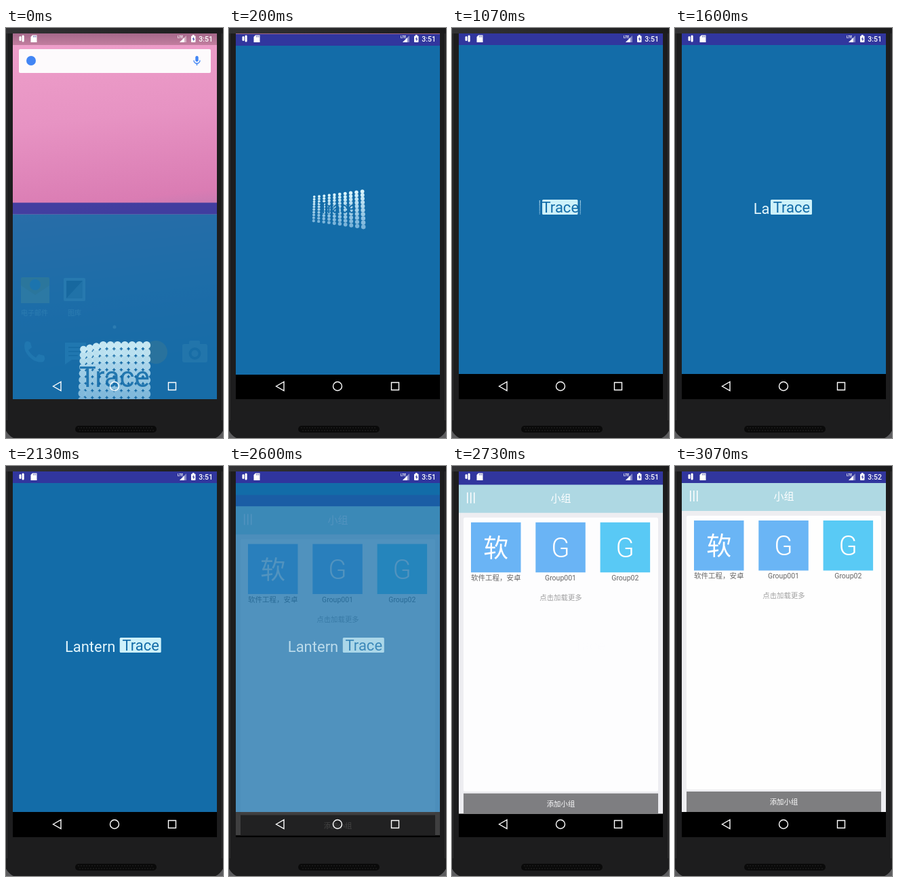
An HTML page with a canvas that plays this animation: 320x602 px, repeating every 3140 ms.

```html
<!DOCTYPE html>
<html lang="zh">
<head>
<meta charset="utf-8">
<style>
html, body { margin: 0; width: 100%; height: 100%; overflow: hidden; background: #111; }
canvas { display: block; width: 320px; height: 602px; }
</style>
</head>
<body>
<canvas id="stage" width="320" height="602"></canvas>
<script>
const LOOP = 3140, STEP = 1000 / 15;
const BLUE = '#136ca8', BAR = '#31369e', PALE = '#cdf1fa';
const FONT = 'Roboto, "Noto Sans CJK SC", "Noto Sans CJK", sans-serif';
const HOST = 'Lantern', BADGE = 'Trace';
const c = document.getElementById('stage').getContext('2d');

const clamp = v => Math.min(1, Math.max(0, v));
const mix = (a, b, p) => a + (b - a) * p;
const part = (t, start, length) => clamp((t - start) / length);
const easeOut = (p, power) => 1 - (1 - p) ** power;
const easeInOut = p => (1 - Math.cos(Math.PI * p)) / 2;

function rect(x, y, w, h, color, r = 0) {
  c.fillStyle = color;
  c.beginPath();
  c.roundRect(x, y, w, h, r);
  c.fill();
}

function disc(x, y, r, color) {
  c.fillStyle = color;
  c.beginPath();
  c.arc(x, y, r, 0, 7);
  c.fill();
}

function path(d, fill, stroke, width = 1) {
  const p = new Path2D(d);
  if (fill) { c.fillStyle = fill; c.fill(p); }
  if (stroke) { c.strokeStyle = stroke; c.lineWidth = width; c.stroke(p); }
}

function text(s, x, y, size, color, align = 'center', weight = 400) {
  c.font = `${weight} ${size}px ${FONT}`;
  c.textAlign = align;
  c.fillStyle = color;
  c.fillText(s, x, y);
}

function fade(stops, x0, y0, x1, y1) {
  const g = c.createLinearGradient(x0, y0, x1, y1);
  stops.forEach((s, i) => g.addColorStop(i / (stops.length - 1), s));
  return g;
}

function phone() {
  rect(0, 0, 320, 602, '#5c5c5e');
  rect(-3, -30, 326, 635, '#1d1d1e', 26);
  rect(0, 0, 320, 8, fade(['#333335', '#1b1b1c'], 0, 0, 320, 0));
  rect(1, 8, 1, 568, '#303031');
  rect(318, 8, 1, 568, '#303031');
  rect(102, 584, 120, 10, '#0a0a0a', 5);
  for (let x = 107; x < 219; x += 4) {
    disc(x, 587, 0.8, '#29292a');
    disc(x + 2, 591, 0.8, '#29292a');
  }
}

function statusIcons(t) {
  rect(19.5, 12, 3, 7, '#fff', 1.5);
  rect(23.5, 10.5, 3.2, 10, '#fff', 1.5);
  path('M39 10.5H45.5V21H36.5V13Z', '#fff');
  path('M40.5 11.5v2M42.3 11.5v2M44 11.5v2', null, BAR, 0.7);
  text('LTE', 253, 14.5, 5, '#fff', 'left', 700);
  path('M256 21L266 11V21Z', 'rgba(255,255,255,.4)');
  path('M256 21L263 14V21Z', '#fff');
  rect(273, 11.5, 6.5, 9.5, '#fff', 1);
  rect(275, 10, 2.5, 2, '#fff');
  path('M276.8 13l-2 3.5h1.5v3l2-3.8h-1.5z', BAR);
  text(t < 2870 ? '3:51' : '3:52', 305, 20, 10.5, '#fff', 'right', 500);
}

function navIcons() {
  path('M69.5 526L81 519.5V532.5Z', null, '#fff', 1.4);
  path('M166.5 526a6.5 6.5 0 1 1-13 0a6.5 6.5 0 1 1 13 0', null, '#fff', 1.4);
  path('M239.5 520.5h11v11h-11z', null, '#fff', 1.4);
}

function home() {
  const sky = ['#ee9fca', '#e793c3', '#da7cb3', '#7a74ac', '#3c6ca4'];
  rect(10, 8, 301, 537, fade(sky, 130, 8, 190, 500));
  rect(10, 8, 301, 17, fade(['#a5688a', '#c27e9f'], 0, 8, 0, 25));
  rect(19, 31, 283, 35, '#fdfafc', 2);
  disc(37, 48, 7, '#4285f4');
  rect(279.3, 41, 4.4, 8.5, '#4285f4', 2.2);
  path('M277 47.5a4.5 4.5 0 0 0 9 0M281.5 52v3', null, '#4285f4', 1.4);

  rect(22, 366, 42, 38, '#f4c542', 2);
  path('M22 378L43 392L64 378V404H22Z', '#ffe08a');
  disc(43, 377, 8, '#6bb8e8');
  rect(85, 367, 32, 34, '#d5e2ea', 2);
  rect(89, 371, 24, 26, '#3d4c58');
  path('M89 397L113 371V397Z', '#8ea4b0');
  text('电子邮件', 42, 422, 10, '#fff');
  text('图库', 101, 422, 10, '#fff');
  disc(160, 439, 2.5, '#fff');
  path('M28 462q3-4 8 0l2 7-5 4q4 7 11 11l4-5 8 2q3 5-1 9c-14 4-32-14-27-28z', '#8fd0f5');
  path('M87 462h31v25H97l-10 7z', '#8fd0f5');
  path('M92 469h20M92 475h20M92 481h14', null, '#4b7fa5', 2);
  disc(160, 476, 16, '#fff');
  disc(221, 476, 17, '#e0a84c');
  rect(260, 464, 37, 27, '#a6bdc8', 3);
  rect(270, 459, 16, 7, '#a6bdc8', 2);
  disc(278.5, 478, 9, '#41718e');
  disc(278.5, 478, 5, '#a6bdc8');
}

function windowBase(color) {
  rect(10, 8, 301, 17, BAR);
  rect(10, 25, 301, 483, color);
  rect(10, 508, 301, 37, '#000');
}

// Dots shrink onto the badge, starting from the top left one.
function dots(t) {
  for (let col = 0; col < 10; col++) {
    for (let row = 0; row < 10; row++) {
      const q = easeOut(part(t, col * 10 + row * 3 - 30, 620), 3.5);
      const x = 159.3 + (col - 4.5) / 4.5 * mix(48, 30, q);
      const y = 263.5 + (row - 4.5) / 4.5 * mix(46, 9.5, q);
      const k = row / 9;
      disc(x, y, mix(5.9, 0.8, q),
        `rgb(${mix(218, 122, k)},${mix(245, 180, k)},${mix(252, 218, k)})`);
    }
  }
}

function splash(t) {
  windowBase(BLUE);
  const move = easeInOut(part(t, 1260, 900));
  const shift = 39 * move;
  const half = 30.5 * part(t, 800, 310);
  if (t < 1110) dots(t);
  if (half) rect(159.3 + shift - half, 252, half * 2, 22, PALE, 1.5);
  const size = mix(42, 22, easeOut(part(t, 0, 180), 2));
  text(BADGE, 159.8 + shift, 263 + size * 0.38, size, BLUE);
  if (!move) return;
  const left = 128.8 - 42 * move, edge = 128.8 + shift;
  c.save();
  c.beginPath();
  c.rect(left, 245, edge - left, 40);
  c.clip();
  text(HOST, left, 273, 22, '#e2f5fb', 'left');
  c.restore();
}

function groups() {
  windowBase('#eeeef1');
  rect(10, 25, 301, 41, '#afd9e3');
  for (const x of [22, 27, 32]) rect(x, 36, 1.5, 16, '#fff');
  text('小组', 160.5, 50, 15, '#fff', 'center', 500);
  rect(17, 73, 287, 402, '#fefefe', 2);
  const tiles = [
    ['软', '软件工程，安卓', '#6ab5f5', 37],
    ['G', 'Group001', '#6ab5f5', 40],
    ['G', 'Group02', '#59caf5', 40]
  ];
  tiles.forEach(([letter, name, color, size], i) => {
    const x = 28 + i * 95.3;
    rect(x, 80, 73.5, 73.5, color);
    text(letter, x + 36.7, 131, size, '#fff', 'center', i ? 300 : 400);
    text(name, x + 36.7, 165, 10.5, '#666');
  });
  text('点击加载更多', 160.5, 194, 10.4, '#a0a0a0');
  rect(17, 478, 287, 30, '#7e7e80');
  text('添加小组', 160.5, 497, 10.4, '#fff');
}

function layer(offset, alpha, draw) {
  c.save();
  c.translate(0, offset);
  c.globalAlpha = alpha;
  draw();
  c.restore();
}

function render(t) {
  phone();
  c.save();
  c.beginPath();
  c.rect(10, 8, 301, 537);
  c.clip();
  if (t < 300) home();
  const rise = 537 * (1 - part(t, -50, 350)) ** 5;
  layer(rise, Math.min(1, 0.89 + t / 800), () => splash(t));
  if (t >= 2585) {
    const enter = 43 * (1 - part(t, 2585, 350)) ** 5;
    const seen = easeOut(part(t, 2585, 200), 4);
    layer(enter, 1, groups);
    // The splash fades away over the arriving page.
    if (seen < 1) layer(0, 1 - seen, () => splash(t));
  }
  statusIcons(t);
  navIcons();
  c.restore();
}

// The picture advances 15 times a second.
const begin = performance.now();
function tick() {
  const t = (performance.now() - begin) % LOOP;
  render(Math.floor((t + 5) / STEP) * STEP);
  requestAnimationFrame(tick);
}
tick();
</script>
</body>
</html>
```
